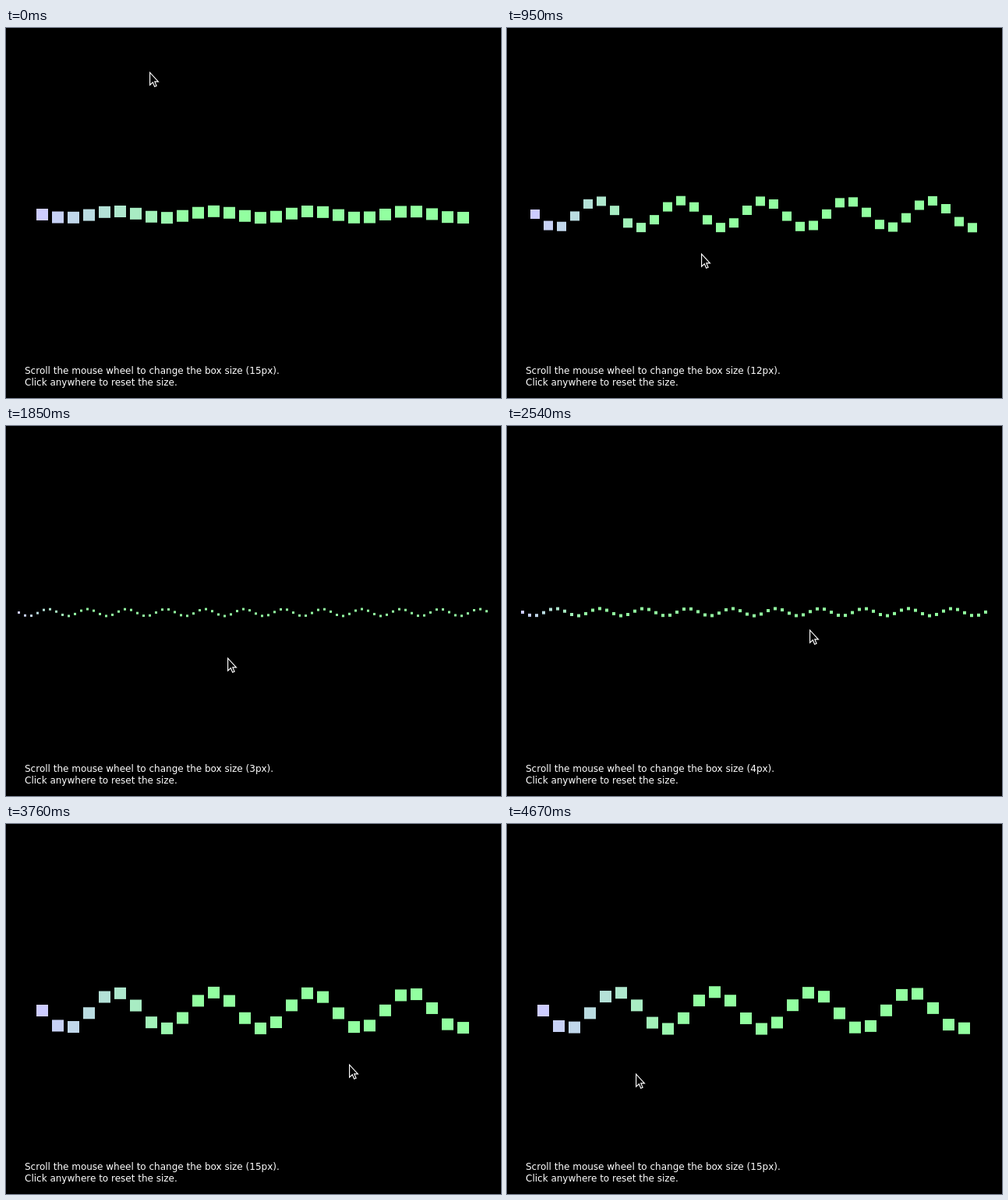
Animation, 635 px wide and 475 px high, one loop 4.69 s. Source, as an HTML page with a canvas:

```html
<!DOCTYPE html>
<html lang="en">
<head>
<meta charset="utf-8">
<title>Box wave</title>
<style>
  html, body { margin: 0; width: 100%; height: 100%; overflow: hidden; background: #000; }
  canvas { position: absolute; left: 0; top: 0; }
  p {
    position: absolute; left: 24px; margin: 0; white-space: pre;
    color: #fff; font: 12px/14px "DejaVu Sans", sans-serif;
  }
  #size-line { top: 433px; }
  #reset-line { top: 448px; }
  #pointer { position: absolute; left: 0; top: 0; width: 14px; height: 21px; overflow: visible; }
</style>
</head>
<body>
<canvas id="wave" width="635" height="475"></canvas>
<p id="size-line"></p>
<p id="reset-line">Click anywhere to reset the size.</p>
<svg id="pointer" viewBox="0 0 14 21">
  <path d="M.6 1.2V17.2L4.3 13.8L6.7 19.3L9.1 18.3L6.8 12.9H11.4Z"
        fill="#000" stroke="#fff" stroke-width="1.15"/>
</svg>
<script>
const LOOP = 4690;
const CLICK = 3760; // the click resets the size
const FULL = 15;
const GAP = 5;
const LAG = 35; // the wave trails the pointer slightly

// Turning points of the hand: time, pointer x and y, wheel size
const moves = [
  { t: 0, x: 184, y: 56, size: FULL },
  { t: 500, x: 242, y: 287, size: FULL },
  { t: 780, x: 242, y: 287, size: FULL },
  { t: 1280, x: 269, y: 295, size: 7 },
  { t: 1400, x: 269, y: 295, size: 7 },
  { t: 1910, x: 285, y: 297, size: 3 },
  { t: 2330, x: 345, y: 112, size: 3 },
  { t: 2640, x: 402, y: 308, size: 4 },
  { t: 3040, x: 440, y: 308, size: 1 },
  { t: 3410, x: 440, y: 308, size: 7 },
  { t: 4000, x: 440, y: 308, size: 7 },
  { t: 4220, x: 257, y: 104, size: 7 },
  { t: 4670, x: 165, y: 320, size: 7 }
];

const linear = u => u;
const smooth = u => u * u * (3 - 2 * u);
const mix = (a, b, u) => a + (b - a) * u;

function at(t, key, ease) {
  const next = Math.max(1, moves.findIndex(m => m.t > t));
  const [a, b] = t < moves.at(-1).t ? [moves[next - 1], moves[next]] : moves.slice(-2);
  const u = Math.min(1, Math.max(0, (t - a.t) / (b.t - a.t)));
  return mix(a[key], b[key], ease(u));
}

function color(i) {
  const u = Math.min(1, i / 9.5);
  return `rgb(${mix(205, 146, u)} ${mix(204, 255, u)} ${mix(255, 160, u)})`;
}

const ctx = document.getElementById("wave").getContext("2d");
const sizeLine = document.getElementById("size-line");
const pointer = document.getElementById("pointer");

function draw(t) {
  const size = t < CLICK ? Math.round(at(t, "size", linear)) : FULL;
  const step = size + GAP;
  const count = Math.floor(635 / step) - 3;
  const left = Math.floor((634 - (count * step - GAP)) / 2);
  const top = 239 - Math.floor(size / 2);
  const amp = at(t - LAG, "y", smooth) * size / 200;

  ctx.clearRect(0, 0, 635, 475);
  for (let i = 0; i < count; i++) {
    ctx.fillStyle = color(i);
    ctx.fillRect(left + i * step, top + amp * Math.sin(i), size, size);
  }
  sizeLine.textContent = `Scroll the mouse wheel to change the box size (${size}px).`;
  const x = Math.round(at(t, "x", smooth)), y = Math.round(at(t, "y", smooth));
  pointer.style.transform = `translate(${x}px, ${y}px)`;
}

const start = performance.now();

function frame() {
  draw((performance.now() - start) % LOOP);
  requestAnimationFrame(frame);
}
frame();
</script>
</body>
</html>
```
